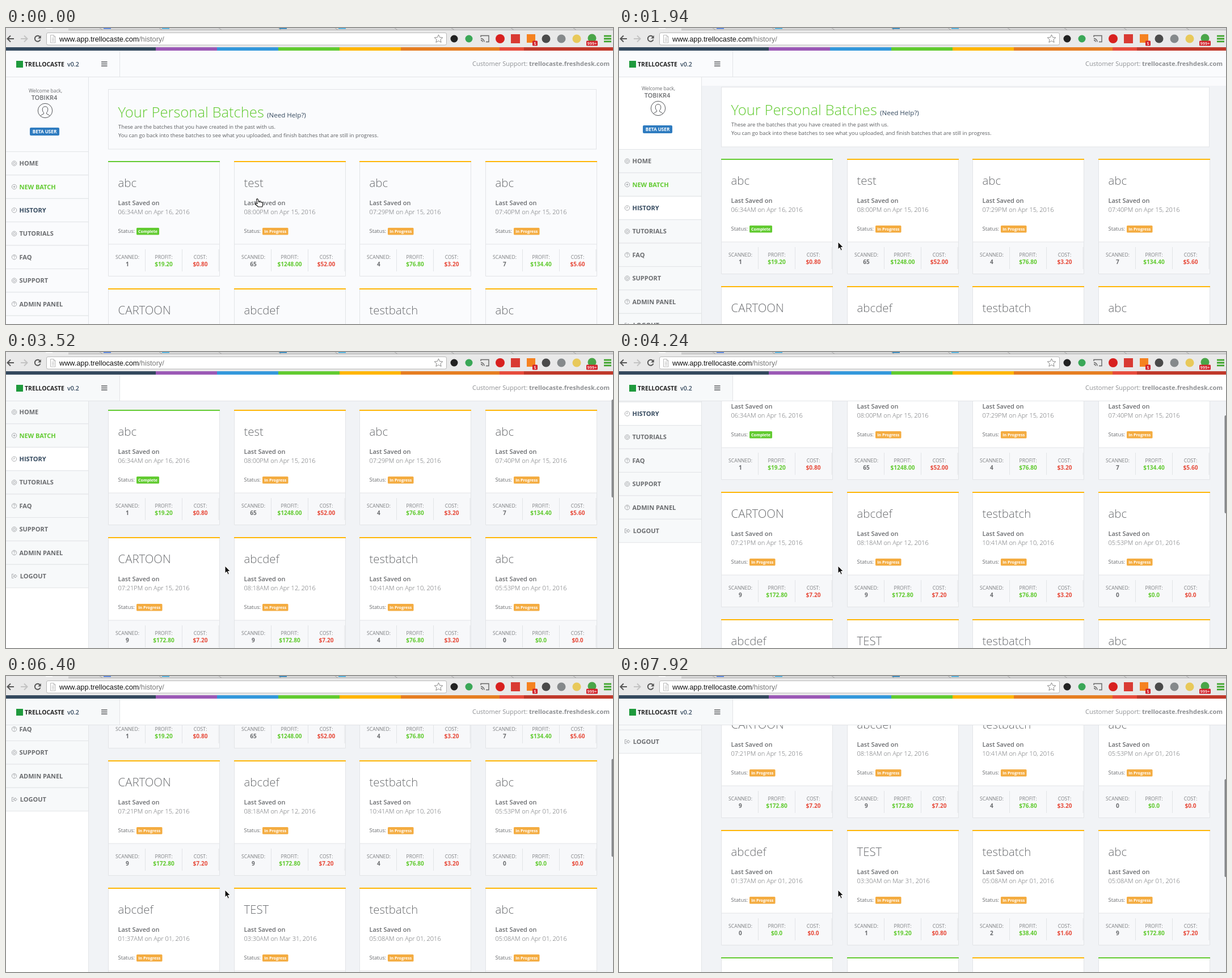
An HTML page for the animation above (8000 ms loop, 1070x523 px).

```html
<!DOCTYPE html>
<html lang="en">
<head>
<meta charset="utf-8">
<title>Your Personal Batches</title>
<style>
  html, body { margin: 0; width: 100%; height: 100%; overflow: hidden; background: #fff; }
  svg {
    display: block; font-family: "Open Sans", sans-serif;
    --page: #f1f3f6; --card: #fff; --foot: #f7f8fa; --side: #f7f9fa; --bar: #fff; --brand: #f7f9fa;
  }
  svg.pale { --page: #fafbfd; --card: #fafbfd; --foot: #fafbfd; --side: #fafbfd; }
  svg.top { --bar: #fafbfd; --brand: #fafbfd; }
  .line { fill: none; stroke: #e2e4e7; }
  .icon { fill: none; stroke: #a0a2a5; stroke-width: .9; }
</style>
</head>
<body>
<svg id="stage" width="1070" height="523" viewBox="0 0 1070 523"></svg>
<script>
const LOOP = 8000;
const GREY = '#6a6c6f', GREEN = '#62cb31', AMBER = '#ffb606', RED = '#e74c3c', NAVY = '#34495e';

const rect = (x, y, w, h, fill, extra = '') =>
  `<rect x="${x}" y="${y}" width="${w}" height="${h}" fill="${fill}" ${extra}/>`;
const dot = (x, y, r, fill) => `<circle cx="${x}" cy="${y}" r="${r}" fill="${fill}"/>`;
const path = (d, attrs = 'class="line"') => `<path d="${d}" ${attrs}/>`;
const text = (x, y, size, weight, fill, str, extra = '') =>
  `<text x="${x}" y="${y}" font-size="${size}" font-weight="${weight}" fill="${fill}" ${extra}>${str}</text>`;
const mid = (x, y, size, weight, fill, str) =>
  text(x, y, size, weight, fill, str, 'text-anchor="middle"');

// Cards: title, time saved, items scanned
const CARD_PITCH = 221.67, ROW_PITCH = 225, CARD_W = 196, CARD_X = 180, CARD_Y = 236;
const cards = [
  ['abc', '06:34AM on Apr 16', 1], ['test', '08:00PM on Apr 15', 65],
  ['abc', '07:29PM on Apr 15', 4], ['abc', '07:40PM on Apr 15', 7],
  ['CARTOON', '07:21PM on Apr 15', 9], ['abcdef', '08:18AM on Apr 12', 9],
  ['testbatch', '10:41AM on Apr 10', 4], ['abc', '05:53PM on Apr 01', 0],
  ['abcdef', '01:37AM on Apr 01', 0], ['TEST', '03:30AM on Mar 31', 1],
  ['testbatch', '05:08AM on Apr 01', 2], ['abc', '05:08AM on Apr 01', 9],
  ['', '', 0], ['', '', 0], ['', '', 0], ['', '', 0]
];
const complete = new Set([0, 12, 13, 15]);
const money = v => '$' + (v ? v.toFixed(2) : '0.0');

function card([title, saved, count], i) {
  const x = Math.round(CARD_X + (i % 4) * CARD_PITCH), y = CARD_Y + Math.floor(i / 4) * ROW_PITCH;
  const done = complete.has(i);
  const stats = [
    ['SCANNED:', count, GREY, 34],
    ['PROFIT:', money(count * 19.2), GREEN, 98],
    ['COST:', money(count * 0.8), RED, 162.5]
  ];
  return `<g transform="translate(${x} ${y})">` +
    rect(.5, .5, CARD_W, 202, 'var(--card)') +
    rect(.5, 146, CARD_W, 57, 'var(--foot)') +
    path(`M.5 0V202.5H${CARD_W + .5}V0M0 146H${CARD_W}M65.5 155v39M130.5 155v39M195 155v39`) +
    rect(0, -1, CARD_W + 1, 2, done ? GREEN : AMBER) +
    text(17.5, 45, 20.4, 300, GREY, title) +
    text(17.5, 77, 11, 600, GREY, title && 'Last Saved on') +
    text(17.5, 92.5, 11.05, 300, GREY, saved && saved + ', 2016') +
    text(17.5, 126, 9.36, 400, GREY, 'Status:') +
    rect(50, 117, done ? 40 : 45.5, 12.5, done ? GREEN : '#f4ac41', 'rx="1.5"') +
    mid(done ? 70 : 72.7, 126, 7.1, 700, '#fff', done ? 'Complete' : 'In Progress') +
    stats.map(([label, value, color, cx]) =>
      mid(cx, 171.5, 8.6, 400, '#7d7f82', label) + mid(cx, 185, 10.1, 700, color, value)).join('') +
    '</g>';
}

const menu = ['HOME', 'NEW BATCH', 'HISTORY', 'TUTORIALS', 'FAQ', 'SUPPORT', 'ADMIN PANEL', 'LOGOUT'];
const plus = 'M12.5 0h4M14.5 -2v4', query = 'M13 -1q0 -1.6 1.5 -1.6t1.5 1.3q0 .8 -1.5 1.6v.6m0 1v1';
const ring = 'M12.5 0a2 2 0 1 0 4 0a2 2 0 1 0 -4 0';
const glyphs = [ring, plus, 'M14.5 -2.5V0H12.5', ring, query, ring, query];

function menuItem(label, i) {
  const y = 218.5 + i * 41.4, color = i === 1 ? GREEN : i === 2 ? NAVY : GREY;
  const glyph = i < 7
    ? '<circle cx="14.5" r="4.2" class="icon"/>' + path(glyphs[i], 'class="icon"')
    : path('M13.5 -3.5H10.5V3.5H13.5M13 -1H16V-3L19.5 0L16 3V1H13Z', 'class="icon"');
  return rect(0, y, 145, 41.4, i === 2 ? 'var(--card)' : 'var(--side)') +
    path(`M0 ${y}H145M0 ${y + 41.4}H145`) +
    `<g transform="translate(0 ${y + 20.7})">${glyph}</g>` +
    text(i === 7 ? 24.7 : 23.5, y + 24.7, 11, 700, color, label);
}

const content =
  rect(180.5, 108.5, 860, 105.5, 'var(--card)', 'stroke="#e2e4e7"') +
  text(197.5, 158, 25.6, 300, GREEN, 'Your Personal Batches') +
  text(460, 158, 11.6, 400, NAVY, '(Need Help?)') +
  text(198, 178, 9.36, 400, '#5d5f62', 'These are the batches that you have created in the past with us.') +
  text(198, 193.3, 9.36, 400, '#5d5f62', 'You can go back into these batches to see what you uploaded, and finish batches that are still in progress.') +
  cards.map(card).join('');

const sidebar =
  mid(69.5, 114, 8.5, 400, GREY, 'Welcome back,') +
  mid(67.5, 127, 11, 600, GREY, 'TOBIKR4') +
  `<g fill="none" stroke="#55575a"><circle cx="69" cy="146" r="12.7"/>
   <path d="M61 155.5q1 -2.5 5.5 -3.8v-2q-2.3 -2 -2.3 -5.5q0 -5.4 4.8 -5.4t4.8 5.4q0 3.5 -2.3 5.5v2q4.5 1.3 5.5 3.8"/></g>` +
  rect(42, 176, 52, 14, '#2f7cc0', 'rx="2"') + mid(68, 186, 8.2, 700, '#fff', 'BETA USER') +
  menu.map(menuItem).join('');

const header =
  rect(0, 40, 1070, 47, 'var(--bar)') + rect(0, 40, 200, 47, 'var(--brand)') +
  path('M0 86.5H1070M200.5 40V86') +
  rect(18, 58, 12, 12, '#1f9a3d') +
  text(33, 67.6, 10.4, 700, '#222', 'TRELLOCASTE') +
  text(108, 67.6, 10.6, 600, NAVY, 'v0.2') +
  path('M168 60h10.5M168 63.5h10.5M168 67h10.5', 'stroke="#55575a" stroke-width="1.5"') +
  text(822, 67, 11, 400, '#8f9194', 'Customer Support:') +
  text(922, 67, 11, 700, '#8f9194', 'trellocaste.freshdesk.com');

const bands = [[0, NAVY], [264, '#9b59b6'], [372, '#3498db'], [480, GREEN], [588, AMBER],
  [696, '#e67e22'], [870, RED], [913, '#c0392b']];
const tabIcons = [[172, '#3f74e0'], [275, '#35a8e0'], [482, '#1478b8'], [586, '#35a8e0']];
const badge = (x, w, label) =>
  rect(x, 22.5, w, 9, '#d2222a', 'rx="1.5"') + mid(x + w / 2, 30, 7.4, 600, '#fff', label);

const browser =
  rect(0, 0, 1070, 34, '#e9e9e9') + rect(110, 0, 960, 3.5, '#d6d6d6') +
  path('M110 3.5H1070', 'stroke="#b4b4b4"') +
  [165, 270, 375, 480, 580, 685, 785, 890, 1000].map(x => path(`M${x} 0l5 3.5`, 'stroke="#a5a5a5"')).join('') +
  rect(70, 0, 12, 1.5, '#fff') +
  tabIcons.map(([x, c]) => rect(x, 0, 13, 1.5, c)).join('') +
  path('M14 19H3M8 13.5L2.5 19L8 24.5', 'fill="none" stroke="#555" stroke-width="2"') +
  path('M26 19H37M32 13.5L37.5 19L32 24.5', 'fill="none" stroke="#c3c3c3" stroke-width="2"') +
  path('M60 16A5 5 0 1 0 60.5 20.5', 'fill="none" stroke="#555" stroke-width="1.9"') +
  path('M61.7 13v5.5h-5.5z', 'fill="#555"') +
  rect(71.5, 8.5, 705, 21.5, '#fff', 'rx="2.5" stroke="#b9b9b9"') +
  path('M78.5 12.5h5.5l3 3v10.5h-8.5zM84 12.5v3h3M80.5 18h5M80.5 20.5h5M80.5 23h5', 'fill="none" stroke="#aaa" stroke-width=".8"') +
  '<text x="94" y="23.7" font-size="12.7" font-family="Liberation Sans, Arial, sans-serif" fill="#111">www.app.trellocaste.com<tspan fill="#777">/history/</tspan></text>' +
  path('M762.5 11.8l2.1 4.7 5.2.5-3.9 3.4 1.2 5-4.6-2.7-4.6 2.7 1.2-5-3.9-3.4 5.2-.5z', 'fill="none" stroke="#888"') +
  dot(790, 19, 6.5, '#222') + dot(816, 19, 6.5, '#3aa757') +
  path('M837 16v-2.5h14v11h-5M837 18.5a6 6 0 0 1 6 6M837 21.5a3 3 0 0 1 3 3', 'fill="none" stroke="#666" stroke-width="1.4"') +
  dot(871, 19, 8, '#d8201f') + rect(890, 11, 16, 16, '#d93a33') + rect(918, 11, 15, 15, '#f58220') +
  badge(928, 9, '5') +
  dot(952, 19, 7.5, '#4a4a4a') + dot(979, 19, 7.5, '#85898b') + dot(1006, 19, 7.5, '#e8c95a') +
  dot(1033, 18, 7.5, '#4aa548') + badge(1023, 20, '999+') +
  path('M1054 14.2h13M1054 19h13M1054 23.8h13', 'stroke="#3fa52c" stroke-width="2.8"') +
  bands.map(([x, c]) => rect(x, 34, 1070 - x, 6, c)).join('');

const stage = document.getElementById('stage');
stage.innerHTML =
  rect(0, 0, 1070, 523, 'var(--page)') +
  rect(146, 87, 924, 15, '#fafbfd', 'id="strip"') +
  rect(0, 87, 145, 436, 'var(--card)') + path('M145.5 87V523') +
  `<g id="scroller">${content}${sidebar}</g>` + header + browser +
  rect(1067.5, 0, 4, 173, '#85878a', 'id="thumb" rx="2"') +
  `<g id="cursor" stroke-linejoin="round">
    <path id="arrow" d="M0 0V13L3 10.3L5.2 15.2L7.4 14.2L5.3 9.5H9.3Z" fill="#111" stroke="#fff"/>
    <path id="hand" d="M-1.5 .8Q0 -1 1.2 .8L2.6 5.5Q4 4.3 5 5.5Q6.3 4.8 7 6Q8.6 5.5 9.2 7L9.7 11L8.5 14H1.5L-3.5 9Q-4.2 7 -2 7.5L0 8.5Z" fill="#fff" stroke="#111" stroke-width="1.1"/>
  </g>`;

// Each state holds until the next one: [start ms, scroll offset]
const scrolls = [
  [0, 0], [1940, 4], [2120, 30], [2300, 61], [2480, 83], [2660, 96], [2840, 102],
  [3170, 106], [3350, 133], [3530, 166], [3710, 190], [3880, 203], [4060, 210], [4240, 213],
  [4870, 217], [5050, 234], [5230, 255], [5410, 273], [5590, 290], [5770, 302],
  [6400, 311], [6580, 340], [6760, 367], [6930, 384], [7110, 391], [7740, 396], [7920, 413]
];
// [start ms, x, y]
const pointer = [
  [0, 443, 302], [140, 360, 312], [290, 260, 330], [440, 190, 335], [590, 330, 310],
  [740, 560, 275], [900, 800, 250], [1050, 1020, 240], [1200, 1028, 300],
  [1350, 850, 370], [1490, 560, 385], [1640, 386, 378]
];
const stateAt = (states, t) => states.findLast(([start]) => start <= t);
const overCard = x => (x - CARD_X) % CARD_PITCH < CARD_W;
const el = id => document.getElementById(id);
const show = (id, on) => el(id).setAttribute('visibility', on ? 'visible' : 'hidden');

function frame() {
  const t = performance.now() % LOOP;
  const [, scroll] = stateAt(scrolls, t), [, x, y] = stateAt(pointer, t);
  stage.classList.toggle('pale', scroll === 0);
  stage.classList.toggle('top', scroll <= 4);
  el('scroller').setAttribute('transform', `translate(0 ${-scroll})`);
  el('thumb').setAttribute('y', 37.3 + scroll * .351);
  el('cursor').setAttribute('transform', `translate(${x} ${y})`);
  show('strip', scroll === 4);
  show('thumb', scroll > 4);
  show('hand', overCard(x));
  show('arrow', !overCard(x));
  requestAnimationFrame(frame);
}
frame();
</script>
</body>
</html>
```
